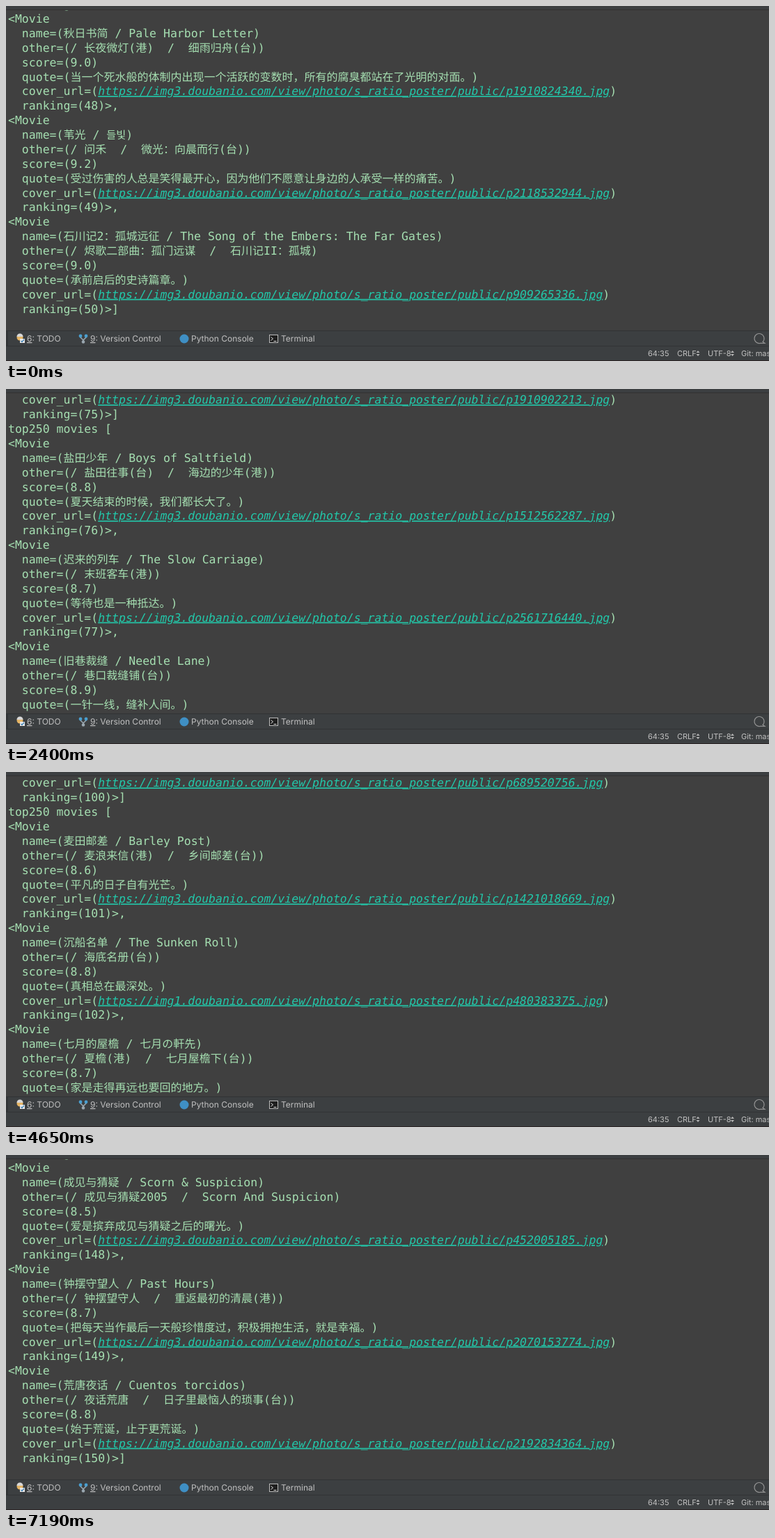
An HTML page for the animation above (8000 ms loop, 1096x511 px).

```html
<!DOCTYPE html>
<html lang="zh-CN">
<head>
<meta charset="utf-8">
<title>Console output</title>
<style>
  html, body { margin: 0; width: 100%; height: 100%; overflow: hidden; background: #404040; }
  svg { display: block; width: 1096px; height: 511px; }
  text { white-space: pre; text-rendering: geometricPrecision; text-spacing-trim: space-all; }
  #console text { font: 16.5px "DejaVu Sans Mono", monospace; fill: #a5dfb1; }
  #console .han { font: 16px "Noto Sans CJK SC", "Noto Sans CJK JP", sans-serif; }
  #console .hangul { font: 15.2px "Noto Sans CJK KR", "Noto Sans CJK SC", sans-serif; }
  .link { fill: #22c8aa; font-style: italic; }
  .link, .key { text-decoration: underline; text-decoration-skip-ink: none; }
  .bar text { font: 12px Inter, sans-serif; fill: #c0c0c0; }
  .bar .status { font-size: 11px; }
</style>
</head>
<body>
<svg viewBox="0 0 1096 511">
  <defs>
    <clipPath id="pane"><rect y="6" width="1096" height="460"/></clipPath>
    <path id="updown" d="M-2.5 -1 L0 -4 L2.5 -1Z M-2.5 1 L0 4 L2.5 1Z" fill="#b5b5b5"/>
  </defs>
  <rect width="1096" height="511" fill="#404040"/>
  <rect width="1096" height="5" fill="#3c3f41"/>
  <rect y="5" width="1096" height="1" fill="#313131"/>
  <g id="console" clip-path="url(#pane)"></g>

  <g class="bar">
    <rect y="467" width="1096" height="44" fill="#3c3f41"/>
    <path d="M0 467.5H1096M0 489.5H1096" stroke="#313335"/>
    <rect y="468" width="3" height="21" fill="#333537"/>
    <rect y="510" width="1096" height="1" fill="#2a2424"/>

    <circle cx="20" cy="477" r="4.5" fill="#e5b566"/>
    <path d="M15.5 476a4.5 4.5 0 0 1 9 0Z" fill="#d8d8d8"/>
    <rect x="20" y="479" width="7" height="6" fill="#e8e8e8"/>
    <path d="M21.5 482l1.5 1.5 3-3.5" fill="none" stroke="#3b7fb5" stroke-width="1.2"/>
    <text x="30" y="483"><tspan class="key">6</tspan>: TODO</text>

    <path d="M107 475V477L111 481V484M115 475V477L111 481" fill="none" stroke="#9aa7b0" stroke-width="1.6"/>
    <g fill="#4a9fd0"><circle cx="107" cy="475" r="2.4"/><circle cx="115" cy="475" r="2.4"/></g>
    <circle cx="111" cy="483.5" r="2.3" fill="#9aa7b0"/>
    <text x="121" y="483"><tspan class="key">9</tspan>: Version Control</text>

    <circle cx="256" cy="479" r="6.5" fill="#3f8fc4"/>
    <text x="266" y="483">Python Console</text>

    <rect x="378.5" y="473.5" width="12" height="11" fill="#1f1f1f" stroke="#bcbcbc"/>
    <path d="M380.5 476.5l3 2.5-3 2.5M384.5 482.5h4" fill="none" stroke="#e0e0e0"/>
    <text x="395" y="483">Terminal</text>

    <path d="M1087 483.5A7 7 0 1 0 1084 485.3L1090 485.5Z" fill="none" stroke="#949494" stroke-width="1.1"/>

    <text class="status" x="922" y="504">64:35</text>
    <text class="status" x="964" y="504">CRLF</text>
    <use href="#updown" x="994" y="500"/>
    <text class="status" x="1008" y="504">UTF-8</text>
    <use href="#updown" x="1043.5" y="500"/>
    <text class="status" x="1056" y="504">Git: master</text>
  </g>
</svg>
<script>
// One record per line: name | other | score | quote | image host | picture id
const records = `
秋日书简 / Pale Harbor Letter|长夜微灯(港)  /  细雨归舟(台)|9.0|当一个死水般的体制内出现一个活跃的变数时，所有的腐臭都站在了光明的对面。|3|1910824340
苇光 / 들빛|问禾  /  微光：向晨而行(台)|9.2|受过伤害的人总是笑得最开心，因为他们不愿意让身边的人承受一样的痛苦。|3|2118532944
石川记2：孤城远征 / The Song of the Embers: The Far Gates|烬歌二部曲：孤门远谋  /  石川记II：孤城|9.0|承前启后的史诗篇章。|3|909265336
北岸渡口 / The Quiet Landing|渡口来客(港)  /  北岸旧事(台)|8.8|每个人心里都有一条过不去的河。|3|1454261925
纸鹤信差 / Paper Errand|纸鹤飞过(台)  /  信差(港)|8.9|有些话，只能交给风去说。|1|792403691
雾中灯塔 / Lantern in the Mist|雾海孤灯(港)|8.7|光不问归期。|3|1374786017
被遗落的青穗的四季 / 忘られ青穂の四季|浮光旧梦(港)  /  令人惦念的青穗的四季(台)|8.9|以戏谑来戏谑戏谑。|1|453723669
溪谷之歌 / The Vales of Brome|山歌悠悠岸岸春(港)  /  晴和暖(台)|9.0|用音乐化解仇恨，让歌声串起美好。|3|2189265302
廉价歌谣 / Cheap Ballad|灰色迷蹤記(台)  /  孤街来客(港)|8.8|故事的高级讲法。|3|1910902213
盐田少年 / Boys of Saltfield|盐田往事(台)  /  海边的少年(港)|8.8|夏天结束的时候，我们都长大了。|3|1512562287
迟来的列车 / The Slow Carriage|末班客车(港)|8.7|等待也是一种抵达。|3|2561716440
旧巷裁缝 / Needle Lane|巷口裁缝铺(台)|8.9|一针一线，缝补人间。|1|501177648
齿轮年华 / Copper Years|The Rivets  /  Ages de cuivre, Les|9.2|大时代中的人生，小人物的悲喜。|3|2173707976
龙套之歌 / 龍套之歌|Song of Extras|8.7|我是一个演员。|3|1043597424
缄语|低语  /  师长|8.7|没有一人完全善，也没有一人完全恶。|3|689520756
麦田邮差 / Barley Post|麦浪来信(港)  /  乡间邮差(台)|8.6|平凡的日子自有光芒。|3|1421018669
沉船名单 / The Sunken Roll|海底名册(台)|8.8|真相总在最深处。|1|480383375
七月的屋檐 / 七月の軒先|夏檐(港)  /  七月屋檐下(台)|8.7|家是走得再远也要回的地方。|3|2173719284
雨夜疑踪 / 빗속의 흔적|雨巷疑云  /  雨夜追踪录|8.7|关于连环杀人悬案的集体回忆。|1|480225538
9号院的风筝 / 9번집의 연등|憨叔的风筝(港)  /  9号小院的风筝|8.8|《他叫阿禾》的《纸窗灯火》。|3|1816276065
笨贼管家 / Lamentable Us|可叹的咱  /  傻贼看门人(港)|8.5|Mr. I Don't Care其实也有Care的时候。|1|792776858
住阁楼的小人米露卡娜 / 屋根ぐらしのミルカリーナ|阁楼少女米璐娜(台)  /  住阁楼的小矮人蜜露佳娜(港)|8.7|曾经的那段美好会沉淀为一辈子的记忆。|3|617533616
雪影之滩 / 雪影の浜へ|雪影之岸  /  Yukikage no hama e|8.8|触不到的恋人。|1|1272904657
柳先生寻春杏 / 柳先生尋春杏|Courting Painter|8.5|林学士是沈砚，顾闻溪四大才子之一。|3|1357915560
成见与猜疑 / Scorn & Suspicion|成见与猜疑2005  /  Scorn And Suspicion|8.5|爱是摈弃成见与猜疑之后的曙光。|3|452005185
钟摆守望人 / Past Hours|钟摆望守人  /  重返最初的清晨(港)|8.7|把每天当作最后一天般珍惜度过，积极拥抱生活，就是幸福。|3|2070153774
荒唐夜话 / Cuentos torcidos|夜话荒唐  /  日子里最恼人的琐事(台)|8.8|始于荒诞，止于更荒诞。|3|2192834364
`.trim().split("\n").map(line => line.split("|"));

const LOOP = 8000;
const pageStarts = [0, 150, 300, 2400, 2550, 4650, 4800, 7040, 7190];
const LINE = 20.88, CELL = 9.934, LEFT = 3;
const consoleGroup = document.getElementById("console");

function add(parent, tag, attributes = {}, content = "") {
  const node = document.createElementNS("http://www.w3.org/2000/svg", tag);
  for (const key in attributes) node.setAttribute(key, attributes[key]);
  node.textContent = content;
  return parent.appendChild(node);
}

function runClass(run) {
  if (run.startsWith("https:")) return "link";
  if (/[\uac00-\ud7af]/.test(run)) return "hangul";
  return /[^\x00-\xff]/.test(run) ? "han" : "plain";
}

function drawLine(page, line, baseline) {
  const indent = line.length - line.trimStart().length;
  const text = add(page, "text", { x: LEFT + indent * CELL, y: baseline });
  const runs = line.trimStart().match(/https:[^)]+|[\uac00-\ud7af]+|[^\x00-\xff\uac00-\ud7af]+|[\x00-\xff]+?(?=https:|[^\x00-\xff]|$)/g);
  for (const run of runs) add(text, "tspan", { class: runClass(run) }, run);
}

function movieLines([name, other, score, quote, host, id], rank, end) {
  return [
    "<Movie",
    `  name=(${name})`,
    `  other=(/ ${other})`,
    `  score=(${score})`,
    `  quote=(${quote})`,
    `  cover_url=(https://img${host}.doubanio.com/view/photo/s_ratio_poster/public/p${id}.jpg)`,
    `  ranking=(${rank})>${end}`
  ];
}

// Even pages show the end of a batch of 25; odd pages catch the next batch arriving.
const pages = pageStarts.map((_, p) => {
  const arriving = p % 2 === 1;
  const firstRank = 48 + 25 * (p >> 1) + (arriving ? 3 : 0);
  const movies = [0, 1, 2].flatMap(i =>
    movieLines(records[p * 3 + i], firstRank + i, !arriving && i === 2 ? "]" : ","));
  const lines = arriving
    ? [...movieLines(records[p * 3 - 1], firstRank - 1, "]").slice(-2), "top250 movies [", ...movies.slice(0, 19)]
    : [`  ranking=(${firstRank - 1})>,`, ...movies];
  const firstBaseline = arriving ? 21.4 : 24 - LINE;
  const page = add(consoleGroup, "g");
  lines.forEach((line, row) => drawLine(page, line, firstBaseline + row * LINE));
  return page;
});

function render(now) {
  const time = now % LOOP;
  const current = pageStarts.findLastIndex(start => time >= start);
  pages.forEach((page, p) => page.setAttribute("display", p === current ? "inline" : "none"));
}

function tick() {
  render(performance.now());
  requestAnimationFrame(tick);
}
tick();
</script>
</body>
</html>
```
